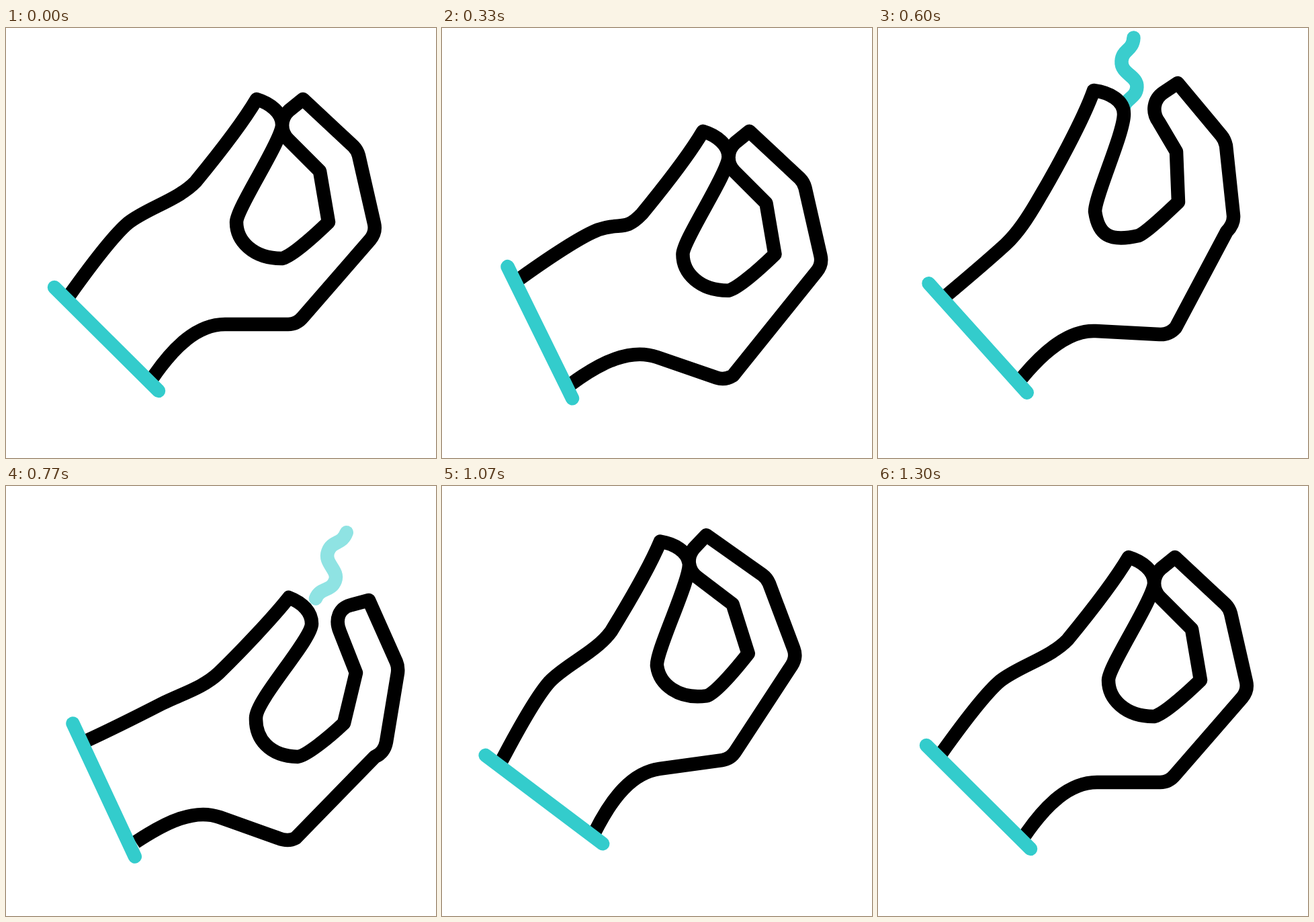
These frames come from a looping animation (640x640 px, 1670 ms). An HTML page:

```html
<!DOCTYPE html>
<html lang="en">
<head>
<meta charset="utf-8">
<title>Pinching hand</title>
<style>
  html, body { margin: 0; width: 100%; height: 100%; overflow: hidden; background: #fff; }
  svg { display: block; width: 100%; height: 100%; fill: none; stroke-width: 20.5; stroke-linecap: round; stroke-linejoin: round; }
  .teal { stroke: #33cccc; }
  #hand { fill: #fff; stroke: #000; stroke-linecap: butt; }
</style>
</head>
<body>
<svg viewBox="0 0 640 640">
  <g id="arm">
    <path id="steam" class="teal" d="M0 0C0 20 -16 18 -16 36C-16 55 9 56 9 73C9 91 -9 90 -9 108"/>
    <path id="hand"/>
    <path class="teal" d="M72 386L227 540"/>
  </g>
</svg>
<script>
const LOOP = 1670, FPS = 30, LAST = 39;
const PIVOT = [177, 447], KNUCKLE = [312, 377];
const [arm, steam, hand] = ['arm', 'steam', 'hand'].map(id => document.getElementById(id));

const CLOSED = `M95 397C120 362 158 310 182 290C210 268 256 256 282 229
  C305 201 350 145 373 106C393 112 411 126 411 144C411 168 343 268 343 289
  C343 317 368 343 410 343C420 343 452 316 480 289L467 213L420 166
  C408 154 408 135 421 123L442 106L517 176Q523 182 525 190L548 291
  Q551 304 542 315L442 430Q433 441 420 441L326 441C285 441 250 474 218 521`;
const PARTING = `M103 389C131 362 165 329 190 310C219 289 241 275 264 240
  C290 200 325 143 340 104C362 107 383 119 383 140C383 166 333 268 333 287
  C334 319 361 335 402 327C411 326 442 295 462 275L451 200L412 157
  C402 145 401 128 413 115L435 100L509 171Q515 177 517 185L540 285
  Q541 298 533 308L444 461Q434 470 420 469L326 458C293 454 258 474 211 525`;
const OPEN = `M102 398C133 372 167 343 190 322C208 305 222 284 240 253
  C262 216 305 138 321 93C345 96 366 108 366 128C366 157 323 250 323 273
  C328 308 344 319 388 309C400 304 428 277 447 259L444 184L418 140
  C407 125 410 106 425 96L446 82L511 160Q516 166 518 175L529 279
  Q530 292 519 303L443 446Q433 457 419 456L324 451C285 449 248 480 214 521`;
const TILTED = `M118 380C155 363 193 344 232 324C262 309 294 300 317 278
  C351 245 398 195 421 166C442 174 455 188 455 205C455 229 372 318 372 345
  C371 376 392 402 434 403C446 402 480 375 503 353L521 278L497 217
  C489 198 496 181 514 177L540 170L581 262Q584 269 583 278L566 381
  Q563 397 549 403L431 524Q420 530 405 524L318 493C281 480 240 499 193 530`;

const NUMBER = /-?[\d.]+/g;

function points(d) {
  const v = d.match(NUMBER).map(Number), out = [];
  for (let i = 0; i < v.length; i += 2) out.push([v[i], v[i + 1]]);
  return out;
}

function turn([x, y], [cx, cy], deg) {
  const a = deg * Math.PI / 180, c = Math.cos(a), s = Math.sin(a);
  return [cx + (x - cx) * c - (y - cy) * s, cy + (x - cx) * s + (y - cy) * c];
}

// Poses are kept relative to the wrist, so its turn is taken out.
const pose = (d, deg) => points(d).map(p => turn(p, PIVOT, -deg));
const closed = pose(CLOSED, 0);
const poseAt = [10, 14, 18, 23, 32];
const poses = [closed, pose(PARTING, 6.5), pose(OPEN, 3.2), pose(TILTED, 20.2), closed];
const coords = closed.map((_, i) => [0, 1].map(axis => poses.map(p => p[i][axis])));

const angleAt = [2, 10, 14, 16, 18, 23, 24, 32, 39];
const angles = [0, 19, 6.5, 2.3, 3.2, 20.2, 20.7, -7.8, 0];

// Monotone cubic through the keys, level at every extreme.
function track(ts, vs, t) {
  const end = ts.length - 1;
  if (t <= ts[0]) return vs[0];
  if (t >= ts[end]) return vs[end];
  const slope = i => (vs[i + 1] - vs[i]) / (ts[i + 1] - ts[i]);
  const tangent = i => {
    if (i === 0 || i === end) return 0;
    const a = slope(i - 1), b = slope(i);
    return a * b > 0 ? 2 * a * b / (a + b) : 0;
  };
  let i = 0;
  while (t >= ts[i + 1]) i++;
  const h = ts[i + 1] - ts[i], u = (t - ts[i]) / h, w = 1 - u;
  return vs[i] * w * w * (1 + 2 * u) + vs[i + 1] * u * u * (3 - 2 * u)
    + h * u * w * (tangent(i) * w - tangent(i + 1) * u);
}

function outline(n) {
  // Thumb and fingers lag behind the first wrist turn.
  const lag = track([2, 10, 14], [0, -19, 0], n);
  const values = coords.flatMap((axes, i) => {
    const p = axes.map(vs => track(poseAt, vs, n));
    return i > 4 && i < 34 ? turn(p, KNUCKLE, lag) : p;
  });
  let i = 0;
  return CLOSED.replace(NUMBER, () => values[i++].toFixed(2));
}

function draw(n) {
  hand.setAttribute('d', outline(n));
  arm.setAttribute('transform', `rotate(${track(angleAt, angles, n).toFixed(3)} ${PIVOT})`);
  const rise = Math.min(1.4, Math.max(0, (24 - n) / 10));
  steam.setAttribute('transform', `translate(356 ${(117 * rise ** 3 - 21.5).toFixed(2)})`);
  steam.setAttribute('opacity', track([10, 19, 27.5], [0, 1, 0], n).toFixed(3));
}

const start = performance.now();
function tick() {
  const t = (performance.now() - start) % LOOP;
  draw(Math.min(LAST, Math.floor((t + 3.5) * FPS / 1000)));
  requestAnimationFrame(tick);
}
tick();
</script>
</body>
</html>
```
